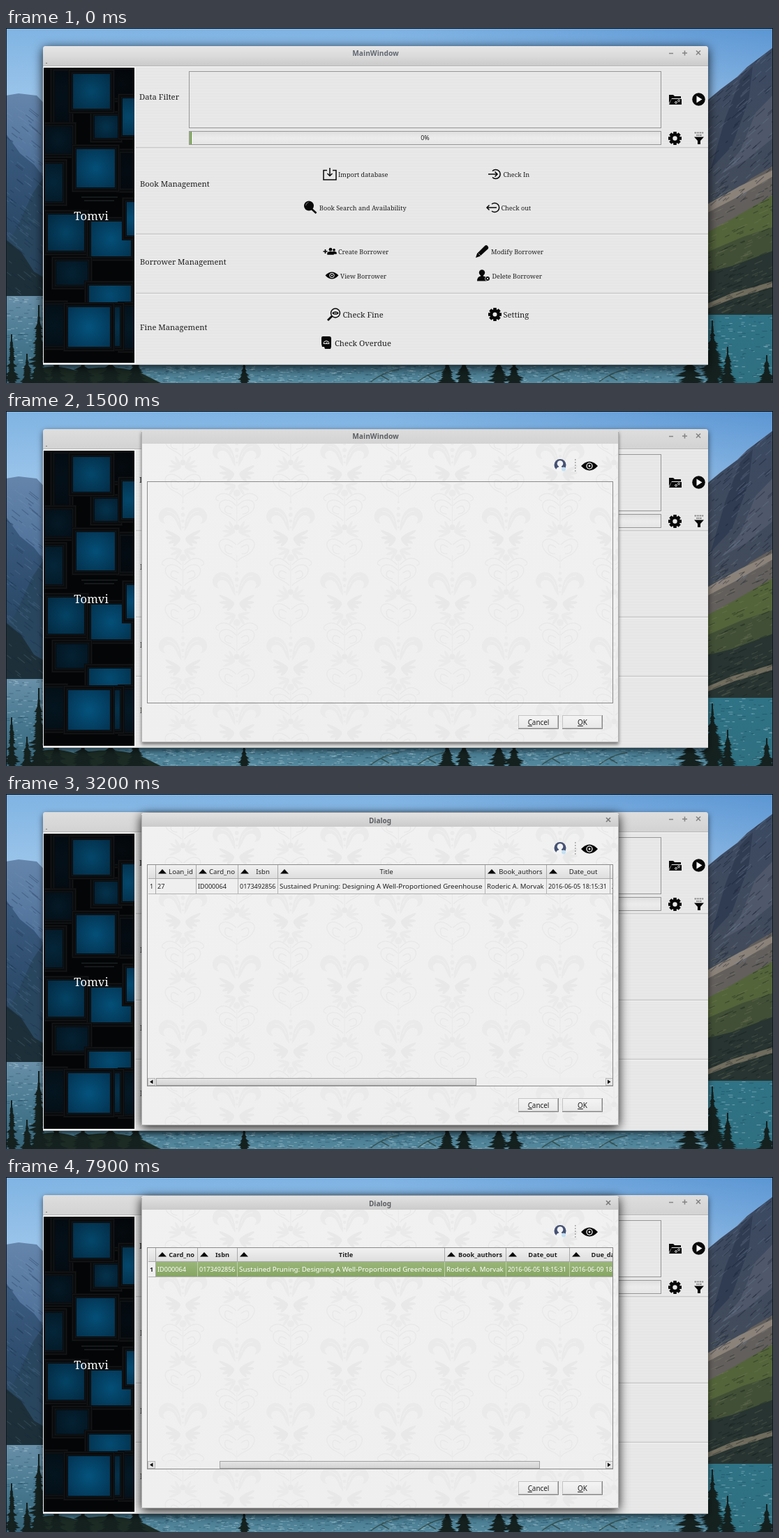
These frames come from a looping animation (1099 by 510 pixels, 8000 ms). An HTML page with a canvas:

```html
<!DOCTYPE html>
<html lang="en">
<head>
<meta charset="utf-8">
<title>Library manager</title>
<style>
html, body { margin: 0; width: 100%; height: 100%; overflow: hidden; background: #4d7896; }
canvas { display: block; }
</style>
</head>
<body>
<canvas id="stage" width="1099" height="510"></canvas>
<script>
const c = document.getElementById('stage').getContext('2d');
const SANS = '"Noto Sans", "Open Sans", sans-serif';
const SERIF = '"Noto Serif", "DejaVu Serif", serif';
const INK = '#1f1f1f', BLACK = '#080808', PANEL = '#e8e8e8';

function rect(x, y, w, h, fill) {
  c.fillStyle = fill;
  c.fillRect(x, y, w, h);
}
function frame(x, y, w, h, color) {
  c.strokeStyle = color;
  c.lineWidth = 1;
  c.strokeRect(x + .5, y + .5, w - 1, h - 1);
}
function fill(d, color) {
  c.fillStyle = color;
  c.fill(new Path2D(d));
}
function line(d, color = BLACK, width = 1) {
  c.strokeStyle = color;
  c.lineWidth = width;
  c.stroke(new Path2D(d));
}
function disc(x, y, r, color) {
  c.fillStyle = color;
  c.beginPath();
  c.arc(x, y, r, 0, 7);
  c.fill();
}
function text(s, x, y, size, { font = SANS, color = INK, align = 'left', weight = 400 } = {}) {
  c.font = `${weight} ${size}px ${font}`;
  c.textAlign = align;
  c.fillStyle = color;
  c.fillText(s, x, y);
}
const serif = (s, x, y, size, opt) => text(s, x, y, size, { font: SERIF, ...opt });

function fade(y0, y1, ...colors) {
  const g = c.createLinearGradient(0, y0, 0, y1);
  colors.forEach((k, i) => g.addColorStop(i / (colors.length - 1), k));
  return g;
}
function shadowed(blur, alpha, paint) {
  c.save();
  c.shadowBlur = blur;
  c.shadowOffsetY = 3;
  c.shadowColor = `rgba(0,0,0,${alpha})`;
  paint();
  c.restore();
}
function seeded(seed) {
  return () => (seed = seed * 16807 % 2147483647) / 2147483647;
}

// ---- desktop ----
function tree(x, top, base, w, rnd) {
  c.fillStyle = '#14211f';
  c.fillRect(x - 1, top - 4, 2, base - top + 4);
  for (let y = top; y < base; y += 3) {
    const half = w / 2 * Math.min(1, (y - top + 5) / (base - top)) * (.45 + .7 * rnd());
    c.beginPath();
    c.moveTo(x, y - 3);
    c.lineTo(x + half, y + 3);
    c.lineTo(x, y + 5);
    c.lineTo(x - half * (.7 + .5 * rnd()), y + 3);
    c.fill();
  }
}
// Short slanted strokes that roughen the ground inside an outline.
function grain(d, x, y, w, h, slope, count, colors, rnd) {
  c.save();
  c.clip(new Path2D(d));
  for (let i = 0; i < count; i++) {
    const len = 3 + rnd() * 10, px = x + rnd() * w, py = y + rnd() * h;
    line(`M${px} ${py}l${len} ${len * slope}`, colors[i % colors.length], 1.2);
  }
  c.restore();
}
function water(x, y, w, h, count, rnd) {
  for (let i = 0; i < count; i++) {
    rect(x + rnd() * w, y + rnd() * h, 2 + rnd() * 5, 1,
      i % 2 ? 'rgba(195,220,230,.4)' : 'rgba(10,45,65,.3)');
  }
}
function desktop() {
  const rnd = seeded(77);
  const sky = c.createLinearGradient(0, 0, 1099, 0);
  sky.addColorStop(0, '#80b4e3');
  sky.addColorStop(.5, '#7fb3e3');
  sky.addColorStop(1, '#5b96d3');
  rect(0, 0, 1099, 510, sky);
  rect(0, 0, 1099, 130, fade(0, 130, 'rgba(190,218,243,0)', 'rgba(190,218,243,.55)'));

  fill('M0 97L18 94 44 97 60 114V400H0z', fade(95, 300, '#6585ab', '#51739b', '#345679'));
  fill('M0 152L20 180 40 196 60 222V400H0z', fade(150, 390, '#3d5d82', '#2d4c6c', '#263f53'));
  fill('M60 205L38 238 14 290 0 312V400H60z', '#29465f');
  const woods = 'M0 304L22 322 40 350 60 362V392H0z';
  fill(woods, '#1d3039');
  grain('M0 100L44 100 60 116V390H0z', 0, 110, 56, 280, .8, 130,
    ['rgba(15,35,60,.25)', 'rgba(130,160,190,.16)'], rnd);
  rect(0, 385, 60, 125, fade(385, 510, '#6990a8', '#47788f', '#376579'));
  water(0, 386, 53, 124, 130, rnd);

  const ridge = 'M1000 108L1024 88 1048 70 1062 56 1078 44 1099 28V420H1000z';
  fill(ridge, fade(40, 400, '#3b4961', '#414b5b', '#434b48'));
  fill('M1052 74L1070 55 1064 104 1040 170 1010 202 1030 132z', '#303c52');
  fill('M1099 96L1074 122 1052 176 1024 210 1060 190 1099 158z', '#4e586a');
  fill('M1000 262L1040 240 1068 216 1099 198V330H1000z', '#625f5c');
  fill('M1000 256L1050 228 1099 204V213L1046 244 1000 268z', '#8b8279');
  fill('M1000 296L1044 272 1099 240V292L1050 316 1000 330z', '#53643a');
  fill('M1000 324L1056 300 1099 286V336L1000 358z', '#414f36');
  fill('M1000 352L1040 342 1099 320V416H1000z', '#273431');
  fill('M1000 398L1040 381 1099 364V372L1044 388 1000 405z', '#6f6b5d');
  grain(ridge, 1003, 40, 96, 215, -.9, 190, ['rgba(15,25,45,.35)', 'rgba(125,140,165,.25)'], rnd);
  grain(ridge, 1003, 220, 96, 190, -.45, 210, ['rgba(15,25,25,.35)', 'rgba(140,140,110,.22)'], rnd);
  rect(1000, 412, 99, 98, fade(412, 510, '#2f7386', '#2f7080'));
  water(1005, 413, 94, 97, 130, rnd);
  rect(52, 478, 955, 32, fade(478, 510, '#42748b', '#55899d'));
  water(52, 485, 955, 25, 900, rnd);

  fill('M40 510V490Q70 482 100 492 150 482 190 494L222 510z', '#1c2b24');
  const trees = [
    [8, 444, 24], [47, 402, 34], [30, 472, 24], [72, 479, 34], [110, 479, 46], [150, 479, 44], [186, 480, 38],
    [341, 484, 22], [632, 480, 30], [656, 480, 36], [706, 480, 32], [728, 482, 34], [980, 479, 46],
    [1012, 424, 44], [1034, 462, 26], [1090, 474, 26]
  ];
  for (const [x, top, w] of trees) tree(x, top, 510, w, rnd);
  for (const x of [545, 612, 790, 872]) {
    line(`M${x - 22} 508Q${x} 492 ${x + 18} 491M${x - 8} 499l12 7`, 'rgba(45,65,58,.75)', 1.5);
  }

  rect(0, 0, 1099, 1, '#05070a');
  rect(0, 0, 1, 510, '#101820');
  rect(1098, 0, 1, 510, '#101820');
}

// ---- main window ----
const TILES = [
  // x, y, w, h, brightness
  [70, 62, 20, 72, .2], [150, 60, 34, 40, .12], [56, 142, 38, 38, .3], [56, 195, 25, 54, .45],
  [127, 126, 33, 32, .6], [167, 101, 17, 53, .85], [96, 66, 53, 50, .85], [165, 180, 19, 50, .15],
  [101, 174, 55, 55, .95], [60, 268, 52, 52, .8], [122, 278, 57, 50, .95], [173, 250, 11, 48, .9],
  [72, 335, 45, 34, .4], [119, 370, 60, 28, .9], [56, 398, 26, 58, .25], [167, 400, 17, 60, .3],
  [153, 401, 10, 56, .6], [89, 401, 60, 57, 1]
];
function sidebar() {
  c.save();
  c.beginPath();
  c.rect(54, 57, 130, 424);
  c.clip();
  rect(54, 57, 130, 424, '#030506');
  for (const [x, y, w, h, k] of TILES) {
    rect(x - 7, y - 7, w + 14, h + 14, '#090b0d');
    frame(x - 6, y - 6, w + 12, h + 12, '#141618');
    frame(x - 2, y - 2, w + 4, h + 4, '#10161a');
    const g = c.createRadialGradient(x + w / 2, y + h / 2, 2, x + w / 2, y + h / 2, Math.max(w, h) * .7);
    g.addColorStop(0, `rgb(4,${82 * k},${124 * k})`);
    g.addColorStop(1, `rgb(3,${50 * k},${80 * k})`);
    rect(x, y, w, h, g);
  }
  line('M108 243H160M112 248H155', '#15191b', 2);
  c.restore();
  serif('Tomvi', 122, 276, 16.6, { color: '#fff', align: 'center' });
}
function gear(x, y, r, hole) {
  c.save();
  c.translate(x, y);
  disc(0, 0, r * .78, BLACK);
  for (let i = 0; i < 8; i++) {
    rect(-r * .24, -r, r * .48, r * .5, BLACK);
    c.rotate(Math.PI / 4);
  }
  disc(0, 0, hole, PANEL);
  c.restore();
}
function eye(x, y, w, h) {
  fill(`M${x - w} ${y}Q${x} ${y - h * 2} ${x + w} ${y}Q${x} ${y + h * 2} ${x - w} ${y}z`, BLACK);
  disc(x, y, h * .72, '#f0f0f0');
  disc(x, y, h * .52, BLACK);
  disc(x, y, h * .22, '#f0f0f0');
}
function person(x, y, s) {
  disc(x, y - 3 * s, 2.5 * s, BLACK);
  fill(`M${x - 5 * s} ${y + 5 * s}v${-2 * s}q0 ${-3 * s} ${5 * s} ${-3 * s}t${5 * s} ${3 * s}v${2 * s}z`, BLACK);
}
function sideIcons() {
  fill('M950 96h6l2 2h9v3h-13l-4 7z', BLACK);
  fill('M953.500 102h14.500v8h-18z', BLACK);
  c.strokeStyle = '#ddd';
  c.lineWidth = 1;
  for (const [x, y] of [[960, 107], [964, 104.5]]) {
    c.beginPath();
    c.arc(x, y, 1.4, 0, 7);
    c.stroke();
  }
  disc(992.5, 102.500, 9.3, BLACK);
  fill('M989.500 97.500v10l8-5z', '#fff');
  gear(958.5, 158.500, 9.5, 3.2);
  fill('M986 156.500h14l-5 5.500v5h-4v-5z', BLACK);
  for (let i = 0; i < 5; i++) {
    rect(987 + i * 2.7, 149.500, 1, 2, '#333');
    if (i % 4) rect(987 + i * 2.7, 153, 1, 2, '#333');
  }
}
function actionIcons() {
  line('M460 204.500h-5v13.500h18v-13.500h-5M464 201v11M460.500 209l3.500 3.500 3.500-3.500', BLACK, 1.5);
  line('M697 205.500A6.500 6.500 0 1 1 697 214.500M691 210h13M700.500 206.500l3.500 3.500-3.500 3.500', BLACK, 1.5);
  line('M696 253A6.500 6.500 0 1 1 696 263M689 258h14M692.500 254.500l-3.500 3.500 3.500 3.500', BLACK, 1.5);
  disc(434, 255.500, 7, BLACK);
  line('M438 260l6.500 6', BLACK, 2.6);
  line('M429.500 255q.5-4 4-4.500', '#777', 1);

  line('M454.500 321h6M457.500 318v6', BLACK, 1.6);
  person(470, 321, .75);
  person(465, 321, .95);
  eye(467, 355.500, 9.5, 5);
  fill('M673 330l2-6 11-11q2-2 4 0t1 4l-12 11z', BLACK);
  line('M677 324l3 3', PANEL, .7);
  disc(682, 351.500, 4.2, BLACK);
  fill('M675 363.500q0-6 5-7v-3h4v3q6 1 6 7z', BLACK);
  disc(690, 360, 3.7, PANEL);
  disc(690, 360, 3, BLACK);
  line('M688.800 358.800l2.400 2.400m0-2.400l-2.400 2.400', '#fff', .8);

  line('M467 414l-6 6', BLACK, 2.8);
  disc(472, 409.500, 7.2, BLACK);
  disc(472, 409.500, 5.7, PANEL);
  eye(472, 409.500, 5, 2.6);
  gear(700.5, 411.500, 9.5, 3);
  fill('M452 445q0-2 2-2h9q3 0 3 3v12l-1 3h-8l-1-3h-3l-1-4z', BLACK);
  line('M455 453.500a4 4 0 0 1 8 0zM459 453l1.500-2', '#eee', 1);
}
function windowButtons() {
  line('M950 36.500h6M969 36h7M972.500 32.500v7M989 32.500l6 6m0-6l-6 6', '#858585', 1.6);
}
function mainWindow(active, pressed) {
  shadowed(active ? 15 : 8, active ? .85 : .6, () => {
    c.fillStyle = '#ccc';
    c.beginPath();
    c.roundRect(53, 26, 953, 458, [4, 4, 0, 0]);
    c.fill();
  });
  c.fillStyle = active ? fade(26, 55, '#e6e6e6', '#dadada', '#c9c9c9') : fade(26, 55, '#dedede', '#d2d2d2');
  c.beginPath();
  c.roundRect(53, 26, 953, 29, [4, 4, 0, 0]);
  c.fill();
  rect(53, 54, 953, 1, '#b7b7b7');
  rect(57, 50, 2, 1, '#777');
  if (active) text('MainWindow', 529.5, 40, 10.2, { weight: 700, color: '#626872', align: 'center' });
  windowButtons();

  rect(53, 55, 953, 428, '#f5f5f5');
  rect(186, 56, 820, 427, PANEL);
  for (let y = 58; y < 483; y += 4) rect(186, y, 820, 1, 'rgba(0,0,0,.012)');
  rect(53, 483, 953, 1, '#bdbdbd');
  sidebar();
  for (const y of [172, 296, 381]) {
    rect(186, y - 1, 820, 2, '#d1d1d1');
    rect(186, y + 1, 820, 1, '#f4f4f4');
  }
  frame(262, 62, 677, 82, '#969696');
  rect(262, 148, 677, 20, fade(148, 168, '#dedede', '#ececec', '#e5e5e5'));
  frame(262, 148, 677, 20, '#969696');
  rect(263, 149, 2, 18, '#8fb56c');
  rect(265, 149, 1, 18, '#5f883d');
  text('0%', 600.500, 161, 9, { align: 'center' });
  sideIcons();

  serif('Data Filter', 191, 103, 11.3);
  serif('Book Management', 192, 227.500, 11.2);
  serif('Borrower Management', 192, 340, 11.1);
  serif('Fine Management', 192, 433.500, 11.2);
  if (pressed) {
    rect(394, 438, 215, 26, '#e3e3e3');
    line('M394.500 464V438.500H609', '#8f8f8f', 1.5);
    line('M395 463.500H608.500V439', '#bcbcbc');
    line('M394 464.500H609.500V438', '#fff');
  }
  actionIcons();
  const actions = [
    ['Import database', 476, 213.500], ['Check In', 712.500, 213.500],
    ['Book Search and Availability', 449, 261.500], ['Check out', 709.500, 261.500],
    ['Create Borrower', 476, 324.500], ['Modify Borrower', 695, 324.500],
    ['View Borrower', 479, 359.500], ['Delete Borrower', 696.500, 359.500]
  ];
  for (const [s, x, y] of actions) serif(s, x, y, 9.1);
  serif('Check Fine', 482.500, 416, 11.2);
  serif('Setting', 712.500, 416, 11.2);
  serif('Check Overdue', 471, 456.500, 11.2);
}

// ---- dialog ----
function petal(x, y, angle, length, width, color) {
  c.fillStyle = color;
  c.beginPath();
  c.ellipse(x + Math.cos(angle) * length / 2, y + Math.sin(angle) * length / 2, length / 2, width / 2, angle, 0, 7);
  c.fill();
}
function motif(x, y) {
  const tone = '#e8e8e8', soft = '#eaeaea';
  for (const side of [-1, 1]) {
    c.save();
    c.translate(x, y);
    c.scale(side, 1);
    fill('M2 18C2-8 14-19 25-16 38-12 38 6 25 7 31 1 27-6 19-5 10-3 10 8 2 18z', soft);
    line('M6 4Q11-11 23-11M10 5Q17-2 26 0', '#f1f1f1', 1);
    for (let i = 0; i < 4; i++) petal(4, 28, -.5 + i * .45, 24 - i * 3, 5, tone);
    for (let i = 0; i < 3; i++) petal(2, 45, -.2 + i * .6, 17, 4, soft);
    line('M1 74C12 61 27 65 25 76S9 87 2 96M6 78q9-7 11 0t-9 8M2 66Q17 50 29 61q3 5-3 6', tone, 1.3);
    for (let i = 0; i < 4; i++) petal(3, 112, -1.1 + i * .5, 18, 4, soft);
    line('M1 130C14 116 30 122 24 135S7 145 1 154M6 134q11-8 11 1t-10 8', tone, 1.3);
    c.restore();
  }
  for (let i = 0; i < 5; i++) disc(x, y - 24 + i * 9, 3 - Math.abs(i - 2) * .7, soft);
  disc(x, y + 56, 5, soft);
  disc(x, y + 105, 4, tone);
  line(`M${x} ${y + 62}V${y + 102}M${x} ${y + 145}v16`, soft, 1.2);
}
function damask() {
  for (let col = 0; col < 9; col++) {
    for (let row = -1; row < 3; row++) motif(253.5 + col * 77.2, 155 + row * 186 + (col % 2 ? 93 : 0));
  }
}
function button(s, x, w) {
  rect(x, 437, w, 20, fade(437, 457, '#f5f5f5', '#e7e7e7'));
  frame(x, 437, w, 20, '#c4c4c4');
  line(`M${x} 456.500h${w - .5}v-19.500`, '#858585', 1);
  line(`M${x + 1} 455.500h${w - 2.500}v-17.500`, '#bdbdbd', 1);
  c.font = `9.9px ${SANS}`;
  const left = x + (w - c.measureText(s).width) / 2;
  text(s, left, 450.500, 9.9);
  rect(left, 452, c.measureText(s[0]).width, 1, INK);
}
// left edge, width, heading, value, value size
const COLUMNS = [
  [214, 58, 'Loan_id', '27', 9.1], [272, 60, 'Card_no', 'ID000064', 9.1], [332, 57, 'Isbn', '0173492856', 9],
  [389, 297, 'Title', 'Sustained Pruning: Designing A Well-Proportioned Greenhouse', 9.8],
  [686, 88, 'Book_authors', 'Roderic A. Morvak', 9.6], [774, 91, 'Date_out', '2016-06-05 18:15:31', 8.9],
  [865, 91, 'Due_date', '2016-06-09 18:15:31', 8.9]
];
function table(selected, scroll) {
  rect(204, 102, 665, 19, fade(102, 121, '#f1f1f1', '#dedede'));
  rect(204, 121, 665, 23, '#efefef');
  const weight = selected ? 700 : 400;
  c.save();
  c.beginPath();
  c.rect(214, 102, 655, 43);
  c.clip();
  if (selected) rect(214, 122, 655, 21, fade(122, 143, '#9ab679', '#86a563'));
  for (const [left, w, head, value, size] of COLUMNS) {
    const x = left - scroll;
    rect(x, 102, 1, 19, '#a9a9a9');
    rect(x, 121, 1, 23, selected ? '#bdcda9' : '#b4b4b4');
    fill(`M${x + 4} 114.500l6-6.500 6 6.500z`, BLACK);
    text(head, x + w / 2 + 7.500, 115, selected ? 9.2 : 9.6, { weight, align: 'center' });
    text(value, x + 3, 136, size, { color: selected ? '#fff' : INK });
  }
  c.restore();
  rect(204, 121, 665, 1, '#a9a9a9');
  rect(204, 143, 665, 1, '#b4b4b4');
  rect(214, 102, 1, 42, '#a9a9a9');
  text('1', 208.500, 136, 9, { weight, align: 'center' });

  rect(204, 408, 665, 11, 'rgba(238,238,238,.75)');
  const thumb = scroll ? 306 : 215;
  rect(thumb, 408, 459, 11, fade(408, 419, '#e6e6e6', '#d2d2d2'));
  frame(thumb, 408, 459, 11, '#a2a2a2');
  for (const x of [203, 859]) {
    rect(x, 408, 11, 11, '#e6e6e6');
    frame(x, 408, 11, 11, '#b7b7b7');
  }
  fill('M206 413.500l4.500-3v6zM866.500 413.500l-4.500-3v6z', BLACK);
}
function dialog({ ready, rows, selected, scroll }) {
  shadowed(ready ? 15 : 5, ready ? .9 : .5, () => {
    c.fillStyle = '#efefef';
    c.beginPath();
    c.roundRect(194, 27, 684, 449, [4, 4, 0, 0]);
    c.fill();
  });
  c.save();
  c.beginPath();
  c.rect(195, 47, 682, 428);
  c.clip();
  rect(195, 47, 682, 428, fade(47, 475, '#f1f1f1', '#efefef'));
  damask();
  c.restore();
  c.fillStyle = ready ? fade(27, 47, '#e2e2e2', '#cbcbcb') : fade(27, 47, '#dcdcdc', '#d3d3d3');
  c.beginPath();
  c.roundRect(194, 27, 684, 20, [4, 4, 0, 0]);
  c.fill();
  line('M194.500 30V475.500H877.500V30', '#b0b0b0');
  const title = { weight: 700, color: '#5c5f63', align: 'center' };
  if (ready) {
    text('Dialog', 536, 41.500, 10, title);
    line('M860 34l6 6m0-6l-6 6', '#777', 1.6);
  } else {
    text('MainWindow', 529.500, 40, 10.2, title);
  }

  disc(794, 77.500, 8.5, '#465273');
  disc(794, 75.500, 4.3, '#f3f4f6');
  fill('M788 86q0-5 4-5.500v-3h4v3q4 .5 4 5.500z', '#f3f4f6');
  disc(799, 83.500, 3, '#c4e0f2');
  for (let y = 69; y < 89; y += 4) rect(815, y, 1.500, 2, '#a8a8a8');
  eye(836, 79, 12, 6.500);
  if (rows) table(selected, scroll);
  frame(202, 101, 668, 319, '#8b8b8b');
  button('Cancel', 734, 58);
  button('OK', 797, 58);
}

// ---- timeline ----
const LOOP = 8000;
const CUTS = [1400, 1500, 1600, 3200, 4600, 7900];
let shown = -1;

function render(step) {
  desktop();
  mainWindow(step < 2, step === 1);
  if (step >= 2) {
    dialog({ ready: step > 2, rows: step > 3, selected: step > 4, scroll: step > 5 ? 58 : 0 });
  }
}
const start = performance.now();
function tick(now) {
  const t = Math.max(0, now - start) % LOOP;
  const step = CUTS.filter(cut => t >= cut).length;
  if (step !== shown) render(shown = step);
  requestAnimationFrame(tick);
}
tick(start);
</script>
</body>
</html>
```
